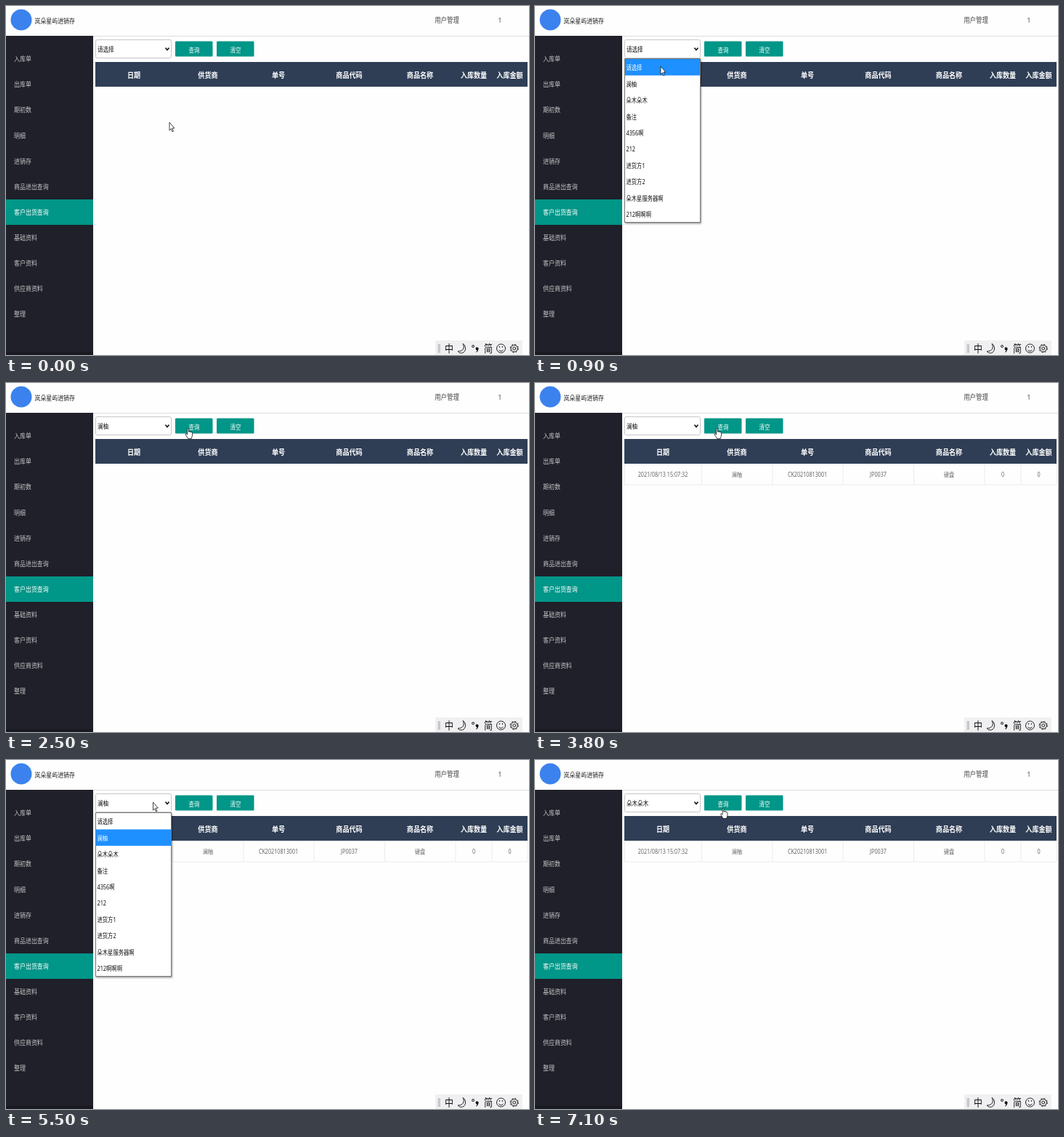
Recreate the animation shown at these times as an HTML page. Size 720 by 480 pixels, loop 8 s.

```html
<!DOCTYPE html>
<html lang="zh-CN">
<head>
<meta charset="utf-8">
<title>进销存</title>
<style>
  html, body { margin: 0; width: 100%; height: 100%; overflow: hidden; background: #fefefe; }
  svg { display: block; width: 100vw; height: 100vh; }
  text {
    font-family: "Noto Sans", "Noto Sans CJK SC", "Noto Sans CJK", sans-serif;
    dominant-baseline: central;
  }
  .line { fill: none; stroke: #222; stroke-width: 1; }
  .pointer { fill: #fff; stroke: #111; stroke-width: 1.2; stroke-linejoin: round; }
</style>
</head>
<body>
<svg id="stage" viewBox="0 0 720 480">
  <defs>
    <filter id="shadow" x="-10%" y="-10%" width="125%" height="125%">
      <feDropShadow dx="1" dy="1.5" stdDeviation="1.3" flood-opacity=".4"/>
    </filter>
  </defs>
  <rect width="720" height="480" fill="#fefefe"/>
  <path d="M0 41.5H720" stroke="#dcdde0"/>
  <circle cx="21" cy="19" r="14.5" fill="#3b82ee"/>
  <rect y="41" width="120" height="439" fill="#1f2029"/>
  <rect y="476" width="120" height="4" fill="#191a21"/>
  <rect y="266" width="120" height="35" fill="#009688"/>
  <rect x="123.5" y="46.5" width="104" height="25" rx="2" fill="#fff" stroke="#c6c6c8"/>
  <path d="M219.5 57.5l2.5 3 2.5-3" fill="none" stroke="#111" stroke-width="1.6"/>
  <g fill="#009688">
    <rect x="233" y="48.5" width="51.5" height="21" rx="1.3"/>
    <rect x="290" y="48.5" width="51.5" height="21" rx="1.3"/>
  </g>
  <rect x="123" y="77" width="595" height="34" fill="#2f3e55"/>

  <g id="labels"></g>
  <g id="record">
    <path d="M123 140H718M123.5 111V140M229.5 111V140M327 111V140M424 111V140M521.5 111V140M619 111V140M669 111V140M718 111V140"
      fill="none" stroke="#ececee"/>
  </g>
  <g id="choice"></g>
  <g id="list">
    <rect x="123.5" y="72.5" width="104" height="225" fill="#fff" stroke="#777" filter="url(#shadow)"/>
    <rect id="highlight" x="124" width="103" height="22.5" fill="#1e90ff"/>
  </g>

  <g id="inputBar">
    <rect x="591" y="460" width="120" height="20" fill="#f0f0f2"/>
    <rect x="594.5" y="465" width="3.5" height="12" fill="#c8c8ca"/>
    <path class="line" d="M629 464.500c3 6 0 10.500-7 10.500 3 4 10.500 3 10.500-4 0-3-1.500-5.500-3.500-6.500z"/>
    <circle class="line" cx="643" cy="468" r="1.500"/>
    <path d="M646.500 471.500a2 2.200 0 1 1 3.800 1q-.6 3-2.800 4l-.4-.8q1.300-1 1.400-2.300-1.800 0-2-1.900z" fill="#111"/>
    <circle class="line" cx="681.5" cy="471" r="6"/>
    <path class="line" d="M678.500 473q3 3.500 6 0"/>
    <path d="M679.500 468v1.800M683.500 468v1.800" stroke="#222" stroke-width="1.2"/>
    <circle class="line" cx="699.7" cy="471" r="4.600"/>
    <circle class="line" cx="699.7" cy="471" r="5.600" stroke-dasharray="2.200"/>
    <circle class="line" cx="699.7" cy="471" r="2"/>
  </g>

  <g id="cursor">
    <path id="arrow" class="pointer" d="M0 0V16L4 12.500 6.500 18.500 9 17.500 6.500 11.500H11.500Z"/>
    <path id="hand" class="pointer" transform="translate(-6.500 -.5)"
      d="M5 2a1.500 1.500 0 0 1 3 0V8a1.500 1.500 0 0 1 3 .5 1.500 1.500 0 0 1 3 .5 1.500 1.500 0 0 1 2.500 1V15L14.500 21H6.500L1 13.500a1.300 1.300 0 0 1 2-1.600L5 13.500Z"/>
  </g>
</svg>
<script>
const $ = id => document.getElementById(id);
const LOOP = 8000, STEP = 100;
const ROW_TOP = 73, ROW_HEIGHT = 22.45;
// The 1200 x 686 page is shown on a 720 x 480 stage.
const PAGE_SCALE = "scale(.6 .7)";

function addText(parent, content, x, y, size, fill, anchor = "start", weight = 400) {
  const node = document.createElementNS("http://www.w3.org/2000/svg", "text");
  const attributes = {
    transform: `translate(${x} ${y}) ${PAGE_SCALE}`,
    "font-size": size, fill, "text-anchor": anchor, "font-weight": weight
  };
  for (const name in attributes) node.setAttribute(name, attributes[name]);
  node.textContent = content;
  $(parent).append(node);
  return node;
}

addText("labels", "岚朵星屿进销存", 39.5, 20.5, 13.2, "#222", "start", 500);
addText("labels", "用户管理", 607, 19.5, 14, "#444", "middle");
addText("labels", "1", 680, 19.5, 14, "#444", "middle");
addText("labels", "查询", 259, 60, 12.5, "#fff", "middle");
addText("labels", "清空", 316, 60, 12.5, "#fff", "middle");

["入库单", "出库单", "期初数", "明细", "进销存", "商品进出查询", "客户出货查询",
 "基础资料", "客户资料", "供应商资料", "整理"].forEach((label, i) =>
  addText("labels", label, 11, 73 + i * 35.1, 13.3, i === 6 ? "#fff" : "#c3c3c6"));

const options = ["请选择", "澜柚", "朵木朵木", "备注", "4356啊", "212",
  "进货方1", "进货方2", "朵木星服务器啊", "212啊啊啊"];

const columns = [
  [176, "日期", "2021/08/13 15:07:32"],
  [278, "供货商", options[1]],
  [375, "单号", "CK20210813001"],
  [472.5, "商品代码", "JP0037"],
  [570, "商品名称", "键盘"],
  [644, "入库数量", "0"],
  [693.5, "入库金额", "0"]
];
for (const [x, title, value] of columns) {
  addText("labels", title, x, 94.5, 15.2, "#fff", "middle", 700);
  addText("record", value, x, 125.5, 12, "#666", "middle");
}

const choice = addText("choice", "", 126, 59, 12.6, "#111");
const optionTexts = options.map((label, i) =>
  addText("list", label, 125.5, 85 + i * ROW_HEIGHT, 12.2, "#111"));

addText("inputBar", "中", 610, 471, 20, "#111", "middle");
addText("inputBar", "简", 664, 471, 20, "#111", "middle");

// Pointer path: time, x, y
const path = [
  [0, 225, 160], [400, 190, 62], [500, 190, 62], [900, 173, 83], [1000, 173, 83],
  [1400, 160, 111], [1800, 160, 111], [2100, 212, 66], [2200, 212, 66],
  [2500, 250.5, 62], [4300, 250.5, 62], [4800, 202.5, 58], [5700, 202.5, 58],
  [6100, 153, 130], [6300, 153, 130], [6700, 215, 85], [6800, 215, 85],
  [7100, 259, 66], [LOOP, 259, 66]
];

function pointerAt(t) {
  const i = path.findIndex(key => key[0] > t);
  const [t0, x0, y0] = path[i - 1], [t1, x1, y1] = path[i];
  const k = (t - t0) / (t1 - t0);
  return [x0 + (x1 - x0) * k, y0 + (y1 - y0) * k];
}

const between = (value, low, high) => value >= low && value < high;
const show = (id, visible) => $(id).style.display = visible ? "" : "none";

function draw(now) {
  const t = Math.floor(now % LOOP / STEP) * STEP;
  const [x, y] = pointerAt(t);
  const selected = t < 1700 ? 0 : t < 6400 ? 1 : 2;
  const hovered = y < ROW_TOP ? selected : Math.floor((y - ROW_TOP) / ROW_HEIGHT);
  const overButton = between(x, 233, 285) && between(y, 48, 70);

  choice.textContent = options[selected];
  show("record", t >= 3800);
  show("list", between(t, 500, 1700) || between(t, 5400, 6400));
  $("highlight").setAttribute("y", ROW_TOP + hovered * ROW_HEIGHT);
  optionTexts.forEach((node, i) => node.setAttribute("fill", i === hovered ? "#fff" : "#111"));

  $("cursor").setAttribute("transform", `translate(${x} ${y}) ${PAGE_SCALE}`);
  show("arrow", !overButton);
  show("hand", overButton);
  requestAnimationFrame(draw);
}
requestAnimationFrame(draw);
</script>
</body>
</html>
```
